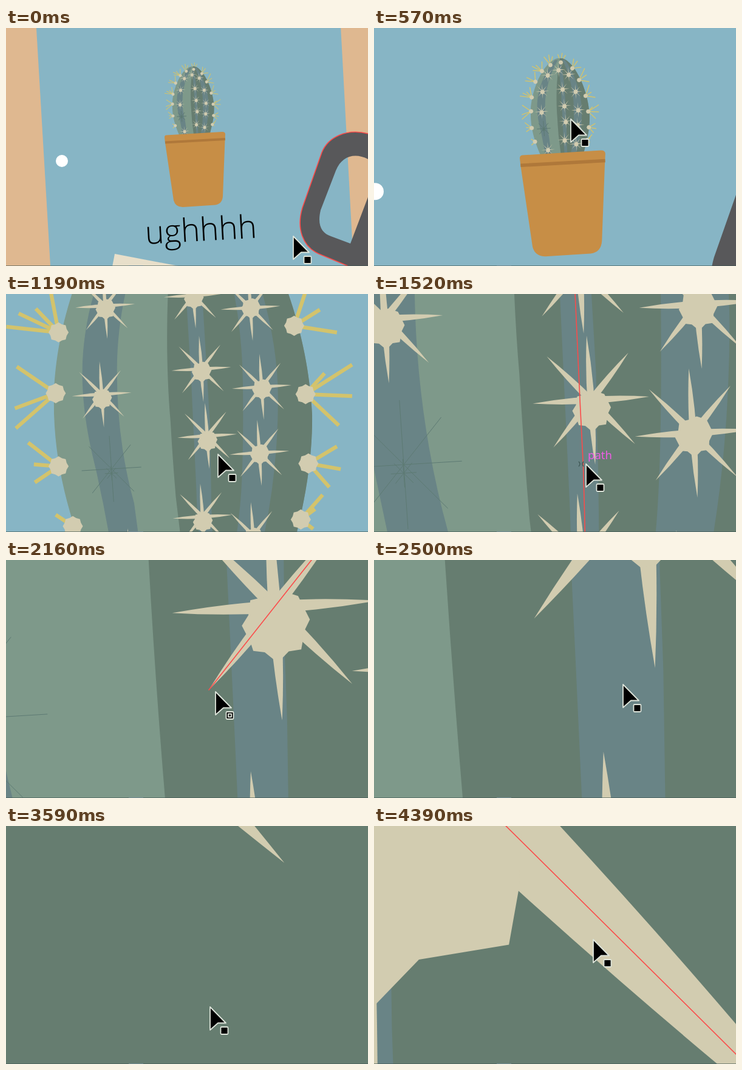
An HTML page for the animation above (4700 ms loop, 596 by 392 pixels).

```html
<!DOCTYPE html>
<html lang="en">
<head>
<meta charset="utf-8">
<title>Cactus zoom</title>
<style>
  html, body { margin: 0; width: 100%; height: 100%; overflow: hidden; background: #dfb890; }
  svg { display: block; width: 596px; height: 392px; }
  .hit { fill: none; stroke: #fb4b4a; stroke-width: 1.6; vector-effect: non-scaling-stroke; visibility: hidden; }
  .faint { fill: none; stroke: #5d7a73; stroke-width: 1; vector-effect: non-scaling-stroke; }
  .spine { fill: none; stroke: #d3c36c; stroke-width: 4; }
  .cream { fill: #d2ccb0; }
  .ui { font: 18.5px "Noto Sans", "Open Sans", sans-serif; }
  #word { font: 300 53px "Open Sans", "Noto Sans", sans-serif; }
</style>
</head>
<body>
<svg viewBox="0 0 596 392">
  <defs>
    <clipPath id="body">
      <path d="M205 412C178 350 160 290 160 220C160 110 225 -34 296 -34C352 -34 426 100 432 235C432 300 418 350 402 412Z"/>
    </clipPath>
  </defs>
  <rect width="596" height="392" fill="#dfb890"/>
  <g id="page">
    <path d="M47 -50L548.500 -50L575 442L76 442Z" fill="#87b5c5"/>
    <circle cx="92" cy="219" r="10" fill="#fff"/>
    <path d="M179 372L300 395L300 430L168 430Z" fill="#e8dfca"/>
    <g id="cactus">
      <g id="spines"></g>
      <g clip-path="url(#body)">
        <rect x="140" y="-50" width="320" height="480" fill="#7e998a"/>
        <path fill="#667d70" d="M296 -36C280 40 275 150 282.900 241.700Q285 280 288.400 320L297 392L300 412H500V-36Z"/>
        <g fill="#698486">
          <path d="M272 -25C225 30 190 110 190 190C190 240 203 285 204.700 293L211.900 327L228 412H256L244.600 327Q226 260 226.500 185C227 110 250 40 285 -25Z"/>
          <path d="M291 -20L294 40L300 120L304.700 198.800L306.700 241.700L309.030 291.100L310.130 315.200L310.500 327L316 412H329L325.700 327L325.620 315.200L325.260 291.100L324.600 272.500L324.200 241.700L321.700 198.800L317 120L309 40L297 -20Z"/>
          <path d="M305 -28C335 30 358 110 359 200Q360 290 356 330Q352 370 344 412H368Q396 320 396 215C396 130 360 30 318 -25Z"/>
        </g>
      </g>
      <g id="stars" class="cream"></g>
      <g id="dots" class="cream"></g>
      <path class="hit" id="stripe" d="M297 -20L309 120L312.900 198.800L315.600 257.800L317.270 291.100L317.950 315.200L318.200 327L322 412"/>
      <path class="hit" id="across" style="stroke:#f08c5a" d="M290.100 257.900L352.700 254.100"/>
      <path class="hit" id="rising" d="M301.250 281.470L341.550 230.470"/>
      <path class="hit" id="falling" d="M297.650 232.410L345.150 279.530"/>
    </g>
    <path fill="#c78e46" d="M261 180Q261 177 264 176.600L356 171Q361 171 361 175L360.500 184L357 277Q356 290 344 291.500L291 295Q279 295 276 284L262 189Z"/>
    <path fill="none" stroke="#af783a" stroke-width="4" d="M262 188.500L360.800 183"/>
    <text id="word" transform="translate(230 356) rotate(-3.300)">ughhhh</text>
    <path id="frame" fill="#58585a" fill-rule="evenodd" d="M640 188L596 174C560 165 530 180 520 205L488 296C478 330 488 360 515 372L563 392L640 424ZM600 218L596 216C575 205 553 210 543 235L518 300C512 325 520 338 535 343L567 355L600 268Z"/>
    <path class="hit" id="tool" d="M640 188L596 174C560 165 530 180 520 205L488 296C478 330 488 360 515 372L563 392"/>
    <path class="hit" id="board" d="M47 -50L548.500 -50L575 442L76 442Z"/>
  </g>
  <rect y="391" width="596" height="1" fill="#3f5652" opacity=".6"/>
  <rect x="202" y="391" width="24" height="1" fill="#6f8890"/>
  <g id="tip" class="ui">
    <rect x="432" y="254" width="102" height="58" rx="8" fill="#cbcbcb"/>
    <text x="442" y="276">X: 7.09 in</text>
    <text x="442" y="300">Y: 2.79 in</text>
    <text x="362" y="246" fill="#ee6cf0">anchor</text>
    <path d="M348 250l8 8m0 -8l-8 8" stroke="#111" stroke-width="1.300"/>
  </g>
  <g id="label" class="ui">
    <path d="M337 276q4 4 0 8m8 -8q-4 4 0 8" fill="none" stroke="#3d5552" stroke-width="1.200"/>
    <text x="352" y="272" fill="#f05ce6">path</text>
  </g>
  <g id="cursor" stroke="#dde4da" stroke-width="1.800" stroke-linejoin="round">
    <path d="M0 0L26 26.500H13L0 38Z"/>
    <rect x="17.500" y="33" width="12" height="12" rx="1.500"/>
    <rect id="core" x="21" y="36.500" width="5" height="5"/>
  </g>
</svg>
<script>
const $ = id => document.getElementById(id);

function add(parent, tag, attrs) {
  const el = document.createElementNS('http://www.w3.org/2000/svg', tag);
  for (const k in attrs) el.setAttribute(k, attrs[k]);
  return $(parent).appendChild(el);
}

// Half axes of the four needles that cross in each star.
const needles = [[31.3, -1.9], [2.32, 34.7], [23.75, 23.56], [20.15, -25.5]];
const lump = [[-7.4, -2], [-2.2, -3.2], [1.9, -5], [7.2, -3.3], [8, -1.7], [10.8, 3.9],
  [8.7, 8.2], [8.6, 10.6], [8.17, 13.02], [4.35, 13.65], [2.47, 15.6], [-0.4, 16],
  [-3, 13.9], [-6.5, 13.5], [-7.3, 11], [-10, 5.8], [-8, 2.6]];

function lens([x, y]) {
  const k = 3.8 / Math.hypot(x, y), nx = -y * k, ny = x * k;
  return `M${-x} ${-y}Q${nx} ${ny} ${x} ${y}Q${-nx} ${-ny} ${-x} ${-y}Z`;
}

// x, y of the crossing and the lift of the lump.
const stars = [
  [321.4, 255.97, 0], [316.45, 340.96, 0], [315.2, 185.4, 2.5], [307, 108, 2], [288, 20, 3],
  [335, 41, 3], [367, 121, 5], [378.7, 204.4, 3], [376.4, 273.7, 4], [369.7, 360.6, 3],
  [238.5, 44, 3], [214, 119, 2], [210.4, 212.2, 0.5], [240, 388, 3]
];
for (const [x, y, lift] of stars) {
  const at = `translate(${x} ${y})`;
  for (const n of needles) add('stars', 'path', { d: lens(n), transform: at });
  add('stars', 'polygon', { points: lump.map(([a, b]) => [a, b - lift]).join(' '), transform: at });
}

const ghost = needles.map(([x, y]) => `M${-x} ${-y}L${x} ${y}`).join('') +
  needles.map(([x, y]) => `M${-x * .22} ${4.6 - y * .22}L${x * .22} ${4.6 + y * .22}`).join('');
add('stars', 'path', { d: ghost, class: 'faint', transform: 'translate(220.7 290.7)' });

// Edge dots, each followed by the offsets of its spines.
const left = [
  [251, -2, -30, -38, -8, -48, 10, -40],
  [212, 26, -46, -22, -42, -3, -28, -28, 0, -44],
  [182, 75, -48, -4, -41, -20, -3, -45],
  [165, 147, -55, -6, -42, -20, -24, -25, -9, -47],
  [162, 211, -41, -28, -43, 16, -42, 37],
  [165, 288, -32, -25, -26, -2, -25, 17],
  [180, 351, -18, -12, -16, 16]
];
const right = [
  [299, -14, -14, -38, 6, -44, 22, -34],
  [352, 13, 6, -44, 24, -34, 41, -5],
  [383, 67, 26, -54, 35, -24, 47, 8],
  [413, 140, 17, -51, 27, -17, 45, 7],
  [425, 212, 49, -31, 49, 2, 35, 33, 20, -22],
  [428, 285, 30, -18, 34, 6, 22, 25],
  [420, 344, 23, -26, 15, -11, 13, 10]
];
for (const [x, y, ...ends] of [...left, ...right]) {
  let d = '';
  for (let i = 0; i < ends.length; i += 2) d += `M${x} ${y}l${ends[i]} ${ends[i + 1]}`;
  add('spines', 'path', { d, class: 'spine' });
  const ring = Array.from({ length: 16 }, (_, i) => {
    const r = i % 2 ? 9.2 : 10.6, a = i * Math.PI / 8;
    return [x + r * Math.cos(a), y + r * Math.sin(a)];
  });
  add('dots', 'polygon', { points: ring.join(' ') });
}

// A view is the scale and the screen place of one needle tip.
const home = [0.2538, 306.7, 137.2];
const plant = [1, 290, 258];
const row = [3.06, 261, 181];
const star = [5.386, 273, 88];
const band = [16.27, -68.6, -538.2];
const point = [38.78, -1680.4, -774.2];
const root = [38.78, -1312.4, -230.7];

$('cactus').setAttribute('transform', 'translate(306.7 137.2) scale(.2538) translate(-290 -258)');

function mix(a, b, u) {
  const s = a[0] * (b[0] / a[0]) ** u;
  const f = a[0] === b[0] ? u : (s - a[0]) / (b[0] - a[0]);
  return [s, a[1] + (b[1] - a[1]) * f, a[2] + (b[2] - a[2]) * f];
}

// time, view, cursor x, cursor y, highlight, overlay
const steps = [
  [0, home, 473, 343, 'tool'],
  [100, home, 455, 312, 'board'],
  [210, home, 410, 245, 'board'],
  [320, home, 362, 180, 'board'],
  [430, home, 330, 145],
  [570, mix(home, plant, .25), 324, 150],
  [680, mix(home, plant, .55), 326, 170],
  [780, mix(home, plant, .85), 332, 205],
  [880, plant, 342, 238],
  [980, plant, 349, 255, 'across', 'tip'],
  [1190, mix(plant, row, .4), 349, 264],
  [1300, mix(plant, row, .8), 349, 274],
  [1520, row, 349, 280, 'stripe', 'label'],
  [1730, mix(row, star, .35), 349, 275],
  [1840, mix(row, star, .7), 348, 262],
  [1950, star, 347, 246],
  [2050, star, 346, 230, 'rising'],
  [2160, star, 345, 217, 'rising', 'anchor'],
  [2290, mix(star, band, .2), 370, 212],
  [2400, mix(star, band, .45), 410, 205],
  [2510, mix(star, band, .7), 460, 198],
  [2610, mix(star, band, .9), 510, 192],
  [2720, band, 546, 186],
  [2820, band, 490, 182],
  [2940, band, 440, 179, 'stripe'],
  [3280, point, 425, 205],
  [3390, point, 395, 240],
  [3480, point, 362, 274],
  [3590, point, 336, 298],
  [3720, point, 334, 300],
  [3830, mix(point, root, .5), 334, 230],
  [3930, root, 335, 160, 'falling'],
  [4150, root, 342, 168, 'falling'],
  [4270, root, 353, 179, 'falling'],
  [4390, root, 361, 187, 'falling']
];
const hits = ['tool', 'board', 'stripe', 'across', 'rising', 'falling'];
const show = (id, on) => { $(id).style.visibility = on ? 'visible' : 'hidden'; };
const start = performance.now();
let last = null;

function draw(now) {
  const t = Math.max(0, now - start) % 4700;
  const step = steps.findLast(s => s[0] <= t);
  if (step !== last) {
    last = step;
    const [, [s, x, y], cx, cy, hit, over] = step;
    $('page').setAttribute('transform',
      `translate(${x} ${y}) scale(${s / home[0]}) translate(${-home[1]} ${-home[2]})`);
    $('cursor').setAttribute('transform', `translate(${cx} ${cy})`);
    for (const id of hits) show(id, id === hit);
    show('tip', over === 'tip');
    show('label', over === 'label');
    show('core', over === 'tip' || over === 'anchor');
  }
  requestAnimationFrame(draw);
}
draw(start);
</script>
</body>
</html>
```
